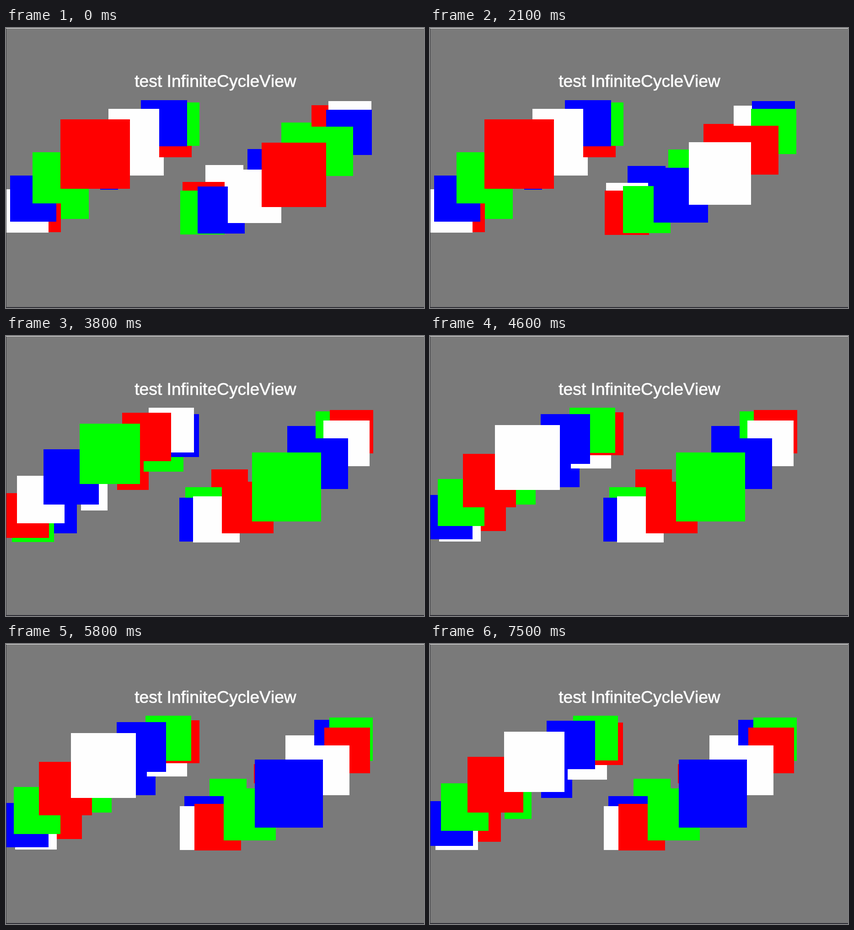
These frames come from a looping animation (914 px wide and 613 px high, 7.6 s). An HTML page with a canvas:

```html
<!DOCTYPE html>
<html lang="en">
<head>
<meta charset="utf-8">
<title>test InfiniteCycleView</title>
<style>
  html, body { margin: 0; width: 100%; height: 100%; overflow: hidden; background: #7a7a7a; }
  canvas { display: block; }
</style>
</head>
<body>
<canvas id="stage" width="914" height="613"></canvas>
<script>
const ctx = document.getElementById('stage').getContext('2d');
const LOOP = 7600, STEP = 100, COUNT = 12;
const RED = '#ff0000', GREEN = '#00ff00', BLUE = '#0000ff', WHITE = '#fefefe';
const RADIUS = 190.5, FLAT = 33, SIZE = 152.5, TILT = Math.PI / 6;

// Each swipe turns its ring by some degrees between two times in ms
const rings = [
  {
    x: 210.2, y: 305.5, side: -1, rest: 0.4,
    colors: [RED, WHITE, BLUE, GREEN],
    swipes: [
      { from: 3200, to: 4600, turn: -143.65 },
      { from: 6000, to: 6900, turn: 125.15 }
    ]
  },
  {
    x: 591, y: 305.7, side: 1, rest: 7.67,
    colors: [RED, GREEN, BLUE, WHITE],
    swipes: [
      { from: 300, to: 1400, turn: -119.6 },
      { from: 1800, to: 2800, turn: 84 },
      { from: 4800, to: 5800, turn: 91.8 }
    ]
  }
];

// Soft start, then a long glide to rest
const glide = u => Math.sin(Math.PI / 2 * u ** 1.175);

function turnAt(ring, t) {
  return ring.swipes.reduce((sum, { from, to, turn }) => {
    const u = Math.min(1, Math.max(0, (t - from) / (to - from)));
    return sum + turn * glide(u);
  }, ring.rest);
}

function placeItem(ring, turn, i) {
  const angle = (turn + i * 360 / COUNT) * Math.PI / 180;
  const along = RADIUS * Math.sin(angle), across = FLAT * Math.cos(angle);
  const depth = across / Math.hypot(along, across);
  const off = across * ring.side;
  return {
    depth,
    half: SIZE * (0.625 + 0.375 * depth) / 2,
    x: ring.x + along * Math.cos(TILT) + off * Math.sin(TILT),
    y: ring.y - along * Math.sin(TILT) + off * Math.cos(TILT),
    color: ring.colors[i % ring.colors.length]
  };
}

function drawRing(ring, t) {
  const turn = turnAt(ring, t);
  const items = Array.from({ length: COUNT }, (_, i) => placeItem(ring, turn, i));
  items.sort((a, b) => a.depth - b.depth);
  for (const { x, y, half, color } of items) {
    const left = Math.round(x - half), top = Math.round(y - half);
    bar(color, left, top, Math.round(x + half) - left, Math.round(y + half) - top);
  }
}

function bar(color, x, y, w, h) {
  ctx.fillStyle = color;
  ctx.fillRect(x, y, w, h);
}

function drawTitle(text) {
  ctx.font = '37.2px "Liberation Sans", Arial, sans-serif';
  ctx.fontKerning = 'none';
  ctx.textAlign = 'center';
  ctx.fillStyle = ctx.strokeStyle = WHITE;
  ctx.lineWidth = 0.7;
  ctx.fillText(text, 458, 128.5);
  ctx.strokeText(text, 458, 128.5);
}

function draw(t) {
  bar('#7a7a7a', 0, 0, 914, 613);
  rings.forEach(ring => drawRing(ring, t));
  drawTitle('test InfiniteCycleView');
  bar('#3a3a3e', 0, 0, 1, 613);
  bar('#f0f0f0', 0, 0, 914, 1);
  bar('#2c2c33', 0, 611, 914, 2);
}

function tick() {
  const t = performance.now() % LOOP;
  draw(Math.floor(t / STEP) * STEP);
  requestAnimationFrame(tick);
}
tick();
</script>
</body>
</html>
```
